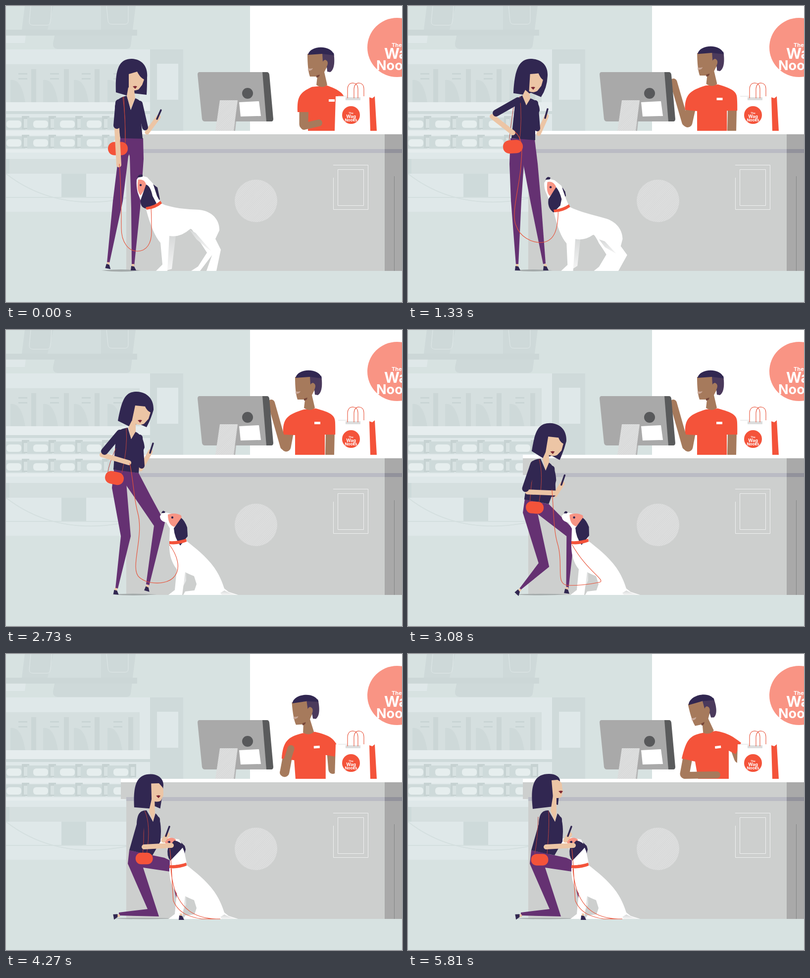
Recreate the animation shown at these times as an HTML page. Size 800x600 px, loop 5.88 s.

```html
<!DOCTYPE html>
<html lang="en">
<head>
<meta charset="utf-8">
<title>Shop counter</title>
<style>
html, body { margin: 0; width: 100%; height: 100%; overflow: hidden; background: #d7e2e1; }
svg { display: block; width: 100%; height: 100%; }
text { font-family: Inter, "Open Sans", sans-serif; font-weight: 700; fill: #fff; }
.line { fill: none; stroke: #e85239; stroke-width: 1.1; }
.limb { fill: none; stroke-linecap: round; stroke-linejoin: round; }
.navy { fill: #312751; }
.red { fill: #f4533a; }
.skin { fill: #ecc5a5; }
.brown { fill: #a67a5c; }
.pants { fill: #653172; }
#strap { stroke: #b8433f; stroke-width: 1; }
</style>
</head>
<body>
<svg viewBox="0 0 800 600" preserveAspectRatio="none">
  <defs>
    <pattern id="hatch" width="3" height="3" patternUnits="userSpaceOnUse" patternTransform="rotate(45)">
      <rect width="3" height="3" fill="#dedfdf"/><rect width="1" height="3" fill="#d5d6d6"/>
    </pattern>
    <linearGradient id="shade" x1="0" y1="0" x2="0" y2="1">
      <stop stop-color="#d6d8d8"/><stop offset="1" stop-color="#f6f6f6"/>
    </linearGradient>
  </defs>
  <rect width="800" height="600" fill="#d7e2e1"/>

  <g id="shelves">
    <path fill="#ced9d9" d="M38 0H112L114 48H32ZM190 0H262L252 80Q251 87 243 87H104Q94 87 95 75L101 48H190Z"/>
    <path fill="#d3dede" d="M96 0H192V48H84Z"/>
    <path fill="none" stroke="#dfe8e8" d="M50 0L47 32Q47 39 55 39H82Q89 39 90 32L92 0M203 0L206 30Q207 37 214 37H240Q247 37 247 30V0"/>
    <path fill="#ccd7d7" d="M0 48H265V60H0Z"/>
    <path fill="#dfe8e9" d="M0 60H40L38 75H0ZM0 88H291V310H0ZM0 340H243V417H0Z"/>
    <path fill="#cfdada" d="M291 88H358V253H291Z"/>
    <path fill="#dfe8e9" d="M305 117H348V190H305Z"/>
    <path fill="#d5dfdf" d="M0 118H270V195H0ZM0 310H243V340H0Z"/>
    <path fill="#e6edee" d="M0 195H291V213H0ZM0 253H240V262H0ZM0 291H240V297H0Z"/>
    <path fill="#cedada" d="M0 213H291V219H0ZM112 340H162V387H112ZM0 310H7V340H0Z"/>
    <path fill="none" stroke="#d4dfdf" stroke-width="2" d="M0 340Q100 418 243 390M0 388H243"/>
  </g>

  <rect x="493" width="307" height="253" fill="#fff"/>
  <circle cx="790" cy="84" r="60" fill="#f99484"/>
  <text x="779" y="83" font-size="11">The</text>
  <text x="764" y="107" font-size="30">Wag</text>
  <text x="748" y="130" font-size="27">Nooks</text>

  <g id="bubble">
    <circle r="33" fill="#ecf3f3"/>
    <path fill="#f4f1f2" d="M-24 -22H-14V29L-24 22ZM-6 -32H6V32H-6ZM14 -29L24 -22V22L14 29Z"/>
    <text y="12" text-anchor="middle" font-size="34" style="font-family:Lato,sans-serif;font-weight:300;fill:#653172">$</text>
  </g>

  <g id="cashier">
    <path id="cArmR" class="limb" stroke="#a67a5c" stroke-width="18"/>
    <path id="cArmL" class="limb" stroke="#a67a5c" stroke-width="19"/>
    <path id="cPants" class="navy"/>
    <path id="cShirt" class="red"/>
    <path id="cFore" class="limb" stroke="#a67a5c" stroke-width="14"/>
    <g id="cTag"><rect width="12" height="5" fill="#fff"/></g>
    <g id="cHead">
      <path class="brown" d="M609 97H646L648 110Q653 112 651 120L647 126L643 134L649 160Q639 168 627 160L629 143H614Q609 130 609 97Z"/>
      <path fill="#4b3a5c" d="M639 96L662 95C664 108 665 128 655 134L649 133L648 123Q653 112 645 109Q641 110 640 113Z"/>
      <path class="navy" d="M610 99C614 79 658 78 663 100L639 97Z"/>
      <path fill="#77473a" d="M627 141L634 139Q633 145 627 145Z"/>
      <path fill="#c9a797" d="M610 126Q614 128 620 126Q618 132 610 131Z"/>
    </g>
  </g>

  <g id="monitor">
    <path fill="#b5b6b6" d="M457 225H466L463 253H455Z"/>
    <path fill="#a9a9a9" d="M391 134H520L528 234H402Q397 234 396 229L387 139Q387 134 391 134Z"/>
    <path fill="#5a5b5c" d="M518 134H527Q531 134 532 139L540 229Q540 234 536 234H526Z"/>
    <path fill="url(#hatch)" d="M432 191H468L460 253H423Z"/>
    <circle cx="488" cy="177" r="11" fill="#58595b"/>
    <path fill="#fff" d="M471 195L511 193L515 223L474 224Z"/>
  </g>

  <g id="bag">
    <path fill="#fff" d="M666 183H736V253H664Z"/>
    <path fill="#dcdddd" d="M686 185H716V191H686Z"/>
    <path stroke="#ddd" d="M671 183H690"/>
    <path class="line" d="M690 187V168Q691 156 701 156Q711 157 711 168V187M703 187V168Q704 156 713 156Q723 157 723 168V183"/>
    <path class="red" d="M734 185L740 187L745 183L749 253H736Z"/>
    <circle cx="697" cy="221" r="18" class="red"/>
    <g text-anchor="middle"><text x="697" y="219" font-size="5">The</text><text x="697" y="227" font-size="9">Wag</text><text x="697" y="234" font-size="8">Nooks</text></g>
  </g>

  <g id="counter">
    <path fill="#cdcfce" d="M232 260H800V294H765V537H243V294H232Z"/>
    <path fill="#a9a9a9" d="M765 260H800V537H765Z"/>
    <path fill="#fff" d="M232 253H800V260H232Z"/>
    <path fill="#babbc4" d="M243 290H765V298H243Z"/>
    <path fill="#92929b" d="M765 290H800V298H765Z"/>
    <path stroke="#858686" d="M784.500 345V537"/>
    <path fill="none" stroke="#f0f1f1" d="M661 322.500H731.500V412.500H661.500V348M670.500 331.500H722.500V404.500H670.500Z"/>
    <circle cx="505" cy="395" r="43" fill="url(#hatch)"/>
  </g>

  <path id="shadow" fill="#a4aaaa"/>
  <path id="legL" class="pants"/>
  <path id="legR" class="pants"/>

  <g id="dog">
    <path id="dFar" fill="url(#shade)"/>
    <path id="dHind" fill="#fff"/>
    <path id="dBody" fill="#fff"/>
    <path id="dThigh" fill="url(#shade)"/>
    <path id="dEar2" class="navy"/>
    <path id="dHead" fill="#fff"/>
    <path id="dPatch" fill="#f79484"/>
    <path id="dEar" class="navy"/>
    <path id="dNose" class="navy"/>
    <g id="dEye"><circle r="2.200" class="navy"/></g>
    <path id="dCollar" class="red"/>
  </g>

  <g id="shoeL"><path class="skin" d="M-2 -9H3V-3H-2Z"/><path class="navy" d="M-3 -5L3 -4L7 4H-4Z"/></g>
  <g id="shoeR"><path class="skin" d="M-2 -9H3V-3H-2Z"/><path class="navy" d="M-3 -5L3 -4L7 4H-4Z"/></g>

  <g id="woman">
    <path id="foreR" class="limb" stroke="#ecc5a5" stroke-width="9"/>
    <path id="phone" class="limb" stroke="#312751" stroke-width="3.500"/>
    <path id="torso" class="navy"/>
    <path id="armR" class="limb" stroke="#312751" stroke-width="12"/>
    <path id="strap" class="line"/>
    <g id="purse"><rect x="-20" y="-13.500" width="40" height="27" rx="13" class="red"/></g>
    <path id="foreL" class="limb" stroke="#ecc5a5" stroke-width="10"/>
    <path id="armL" class="limb" stroke="#312751" stroke-width="14"/>
    <path id="hair" class="navy"/>
    <path id="neck" class="skin"/>
    <path id="face" class="skin"/>
    <g id="lips"><path fill="#7a2632" d="M-5 -1L0 -2L4 -1L0 4Z"/></g>
  </g>
  <path id="leash" class="line"/>
</svg>

<script>
const LOOP = 5880, STEP = 70;
const $ = id => document.getElementById(id);
const NUM = /-?\d+(\.\d+)?/g;
const tracks = [];

// Keys map a time to a path or transform; all strings of one track share a structure.
function track(id, attr, keys) {
  const times = Object.keys(keys).map(Number);
  const shape = keys[times[0]];
  const values = times.map(t => keys[t].match(NUM).map(Number));
  tracks.push({ node: $(id), attr, times, shape, values });
}
const path = (id, keys) => track(id, 'd', keys);
const move = (id, keys) => track(id, 'transform', keys);

// Monotone cubic: smooth through keys without overshoot.
function sample({ times, values }, t) {
  const last = times.length - 1;
  if (t >= times[last]) return values[last];
  const i = times.findIndex(x => x > t) - 1;
  const span = times[i + 1] - times[i], u = (t - times[i]) / span;
  return values[i].map((a, n) => {
    const slope = k => k < 0 || k >= last ? 0 : (values[k + 1][n] - values[k][n]) / (times[k + 1] - times[k]);
    const tangent = k => {
      const p = slope(k - 1), q = slope(k);
      return p * q > 0 ? 2 * p * q / (p + q) : 0;
    };
    const b = values[i + 1][n], v = 1 - u;
    return a * (1 + 2 * u) * v * v + b * u * u * (3 - 2 * u)
      + span * u * v * (v * tangent(i) - u * tangent(i + 1));
  });
}

function draw(now) {
  const t = Math.floor(now % LOOP / STEP) * STEP;
  for (const item of tracks) {
    const v = sample(item, t);
    let n = 0;
    item.node.setAttribute(item.attr, item.shape.replace(NUM, () => +v[n++].toFixed(2)));
  }
}

// Repeated shelf stock
const box = (x, y, w, h, fill, rx = 0) => `<rect x="${x}" y="${y}" width="${w}" height="${h}" rx="${rx}" fill="${fill}"/>`;
let stock = '';
for (const [i, x] of [51, 117, 179, 247].entries()) {
  const dash = 25 + i * 64;
  stock += `<path fill="#ced9d9" d="M${x - 42} 195V150Q${x - 20} 146 ${x - 12} 195Z"/>`
    + box(x, 128, 10, 67, '#cbd6d6') + box(dash, 136, 18, 3, '#c9d5d5') + box(dash, 146, 18, 3, '#c9d5d5');
}
for (const y of [226, 264]) for (let i = 0; i < 5; i++) {
  const x = i * 54;
  stock += box(x - 11, y, 50, 25, '#cedada') + box(x + 32, y - 3, 15, 27, '#c6d2d2')
    + box(x + 36, y + 3, 8, 18, '#d8e2e2') + box(x + 1, y + 6, 30, 15, '#e6eeee', 6);
}
$('shelves').insertAdjacentHTML('beforeend', stock);

const hold = (p, from, to) => ({ [from]: p, [to]: p });

// Payment bubble
move('bubble', { 0: 'translate(440,68) scale(0)', 1330: 'translate(440,68) scale(0)',
  ...hold('translate(440,68) scale(1)', 1750, 2480), 2700: 'translate(440,68) scale(0)' });

// Cashier
path('cShirt', {
  0: 'M589,215 C588,185 592,176 618,164 L648,161 C668,168 684,176 684,190 L684,215 L666,215 L666,253 L610,253 L611,215Z',
  700: 'M558,207 C566,180 572,171 600,162 L628,159 C655,169 664,176 664,186 L666,213 L646,213 L646,253 L585,253 L584,213Z',
  ...hold('M560,212 C558,178 570,171 602,161 L626,159 C655,167 665,172 665,188 L666,212 L644,212 L644,253 L584,253 L584,213Z', 1700, 3850),
  4750: 'M553,212 C562,175 568,165 595,160 L622,156 C645,160 655,166 673,180 L662,203 L648,196 L648,253 L586,253 L580,218Z' });
path('cArmL', {
  0: 'M602,205 L602,240', 700: 'M572,205 L561,235',
  ...hold('M572,205 L566,237', 1600, 3850), 4750: 'M566,205 L559,243' });
path('cFore', {
  0: 'M602,244 L632,237', 500: 'M566,240 L552,215', 700: 'M558,236 L541,194',
  ...hold('M561,236 L536,148', 1600, 3850), 4750: 'M559,246 L624,245' });
path('cArmR', {
  0: 'M674,210 L676,250', 700: 'M656,205 L655,252',
  ...hold('M655,205 L654,252', 1600, 3850), 4750: 'M660,190 L668,212' });
path('cPants', { ...hold('M630,255 L644,255 L644,258 L630,258Z', 0, 3850), 4750: 'M628,250 L648,250 L648,258 L628,258Z' });
move('cTag', { 0: 'translate(652,189) rotate(0)', 700: 'translate(628,186) rotate(0)',
  ...hold('translate(623,186) rotate(0)', 1600, 3850), 4750: 'translate(620,187) rotate(-7)' });
move('cHead', { 0: 'translate(0,0) rotate(0,636,150)', 700: 'translate(-22,-2) rotate(-1,636,150)',
  ...hold('translate(-25,-2) rotate(0,636,150)', 1700, 3850),
  4800: 'translate(-32,0) rotate(-11,636,150)', 5600: 'translate(-33,-2) rotate(-12,636,150)' });

// Woman: standing, arm raised, bending, kneeling
path('torso', {
  0: 'M220,205 C222,190 230,185 244,182 L252,211 L261,187 C272,190 277,200 278,215 L273,235 L276,269 L231,268Z',
  ...hold('M216,200 C219,186 226,184 232,181 L239,201 L246,187 C258,190 266,198 266,212 L257,235 L257,272 L209,268Z', 650, 2300),
  2730: 'M222,215 C226,202 234,200 246,198 L253,221 L261,206 C274,212 279,225 280,238 L270,262 L268,290 L217,283Z',
  3450: 'M264,345 C265,322 272,317 284,317 L297,340 L302,323 C311,330 313,345 313,360 L312,380 L296,408 L249,398Z' });
path('neck', {
  0: 'M247,165 L259,171 L261,187 L252,209 L244,182Z',
  ...hold('M237,170 L246,178 L247,188 L239,201 L231,182Z', 650, 2300),
  2730: 'M254,184 L262,190 L262,206 L253,221 L247,198Z',
  ...hold('M296,304 L301,310 L302,323 L297,340 L290,318Z', 3450, 4000),
  4480: 'M293,287 L300,291 L300,323 L297,340 L288,318Z' });
path('armL', { 0: 'M228,196 L224,242', ...hold('M222,192 L178,217', 650, 2300), 2730: 'M230,209 L199,246', 3450: 'M275,328 L267,384' });
path('armR', { 0: 'M270,198 L281,246', ...hold('M257,197 L261,248', 650, 2300), 2730: 'M270,218 L274,275', 3450: 'M305,335 L306,378' });
path('foreL', { 0: 'M224,248 L228,322', ...hold('M170,224 L212,257', 650, 2300), 2730: 'M194,253 L248,269', 3450: 'M279,391 L334,388' });
path('foreR', { 0: 'M285,256 L308,225', ...hold('M264,259 L280,223', 650, 2300), 2730: 'M272,282 L292,246', 3450: 'M318,378 L327,366' });
path('phone', { 0: 'M305,229 L313,211', ...hold('M277,227 L282,209', 650, 2300), 2730: 'M291,249 L297,230', 3450: 'M323,369 L330,350' });
path('legL', {
  0: 'M231,267 L224,330 L216,395 L204,520 L209,521 L236,395 L247,305 L262,268Z',
  ...hold('M207,268 L205,320 L208,395 L218,524 L223,524 L229,395 L235,305 L240,270Z', 650, 2300),
  2730: 'M218,283 L214,320 L232,418 L221,524 L226,524 L252,418 L243,310 L245,285Z',
  3450: 'M249,398 L246,425 L286,517 L228,524 L228,530 L309,532 L277,433 L285,405Z' });
path('legR', {
  0: 'M240,267 L250,305 L253,410 L254,527 L259,527 L271,410 L278,310 L277,268Z',
  ...hold('M225,268 L231,310 L248,400 L273,523 L278,522 L269,400 L262,320 L256,271Z', 650, 2300),
  2730: 'M235,284 L243,315 L299,397 L283,515 L289,519 L321,390 L293,338 L268,290Z',
  3450: 'M255,400 L277,433 L331,441 L352,528 L355,530 L345,425 L320,413 L296,408Z' });
move('shoeL', { 0: 'translate(205,528) rotate(10)', ...hold('translate(220,532) rotate(0)', 650, 2300),
  2730: 'translate(221,532) rotate(5)', 3450: 'translate(221,531) rotate(80)' });
move('shoeR', { 0: 'translate(256,532) rotate(0)', ...hold('translate(277,532) rotate(0)', 650, 2300),
  2730: 'translate(284,525) rotate(15)', 3450: 'translate(353,535) rotate(0)' });
path('shadow', { 0: 'M193,536 Q233,532 273,536 Q233,541 193,536Z', ...hold('M213,536 Q252,532 292,536 Q252,540 213,536Z', 650, 2300),
  2730: 'M213,536 Q258,533 305,536 Q258,540 213,536Z', 3450: 'M213,536 Q270,534 340,536 Q270,539 213,536Z' });

const headKeys = (up, lookDown, glance, bend, kneel, lookUp) => ({ 0: up, ...hold(lookDown, 750, 1150),
  ...hold(glance, 1650, 2300), 2730: bend, ...hold(kneel, 3450, 4000), 4480: lookUp });
path('hair', headKeys(
  'M222,175 C220,125 230,107 254,107 C277,108 287,125 285,145 Q285,165 284,180 L258,177 L246,182Z',
  'M212,177 C216,130 224,108 250,108 C274,109 285,124 284,142 Q283,167 267,186 L248,176 L235,180Z',
  'M215,176 C214,125 224,105 246,105 C270,106 279,122 277,142 Q276,165 273,181 L250,176 L239,181Z',
  'M226,184 C234,142 240,125 264,125 C288,126 299,143 298,162 Q293,180 284,197 L268,190 L248,195Z',
  'M269,306 C271,264 278,244 303,244 C327,245 336,262 334,281 Q330,305 324,324 L306,315 L294,320Z',
  'M252,314 C247,270 252,243 285,243 C298,243 306,249 307,256 Q306,280 303,306 L297,304 L294,309Z'));
path('face', headKeys(
  'M248,138 L265,133 C270,143 274,146 279,149 L275,160 L268,169 C262,172 254,172 248,170Z',
  'M249,139 L266,138 C269,146 271,150 274,152 L270,164 L262,173 C256,177 250,176 246,174Z',
  'M241,136 L258,133 C262,140 266,142 270,144 L268,156 L260,170 C254,174 246,173 241,170Z',
  'M261,153 L281,155 C284,162 288,165 292,167 L288,180 L279,190 C270,194 262,192 254,186Z',
  'M298,272 L319,272 C321,280 326,283 328,284 L325,298 L317,308 C312,312 304,311 296,306Z',
  'M290,256 L302,255 C308,258 312,262 311,268 L313,279 L310,290 C304,293 298,292 293,291Z'));
move('lips', headKeys('translate(261,164)', 'translate(253,167)', 'translate(253,163)',
  'translate(271,184)', 'translate(307,302)', 'translate(309,279)'));

move('purse', { 0: 'translate(226,289) rotate(0) scale(1)', 700: 'translate(212,287) rotate(4) scale(1)',
  ...hold('translate(212,285) rotate(-5) scale(1)', 1500, 2300), 2730: 'translate(219,300) rotate(12) scale(0.95)',
  ...hold('translate(291,414) rotate(-4) scale(0.87)', 3450, 4000), 4750: 'translate(251,416) rotate(10) scale(0.87)',
  5150: 'translate(254,416) rotate(7) scale(0.87)', 5810: 'translate(266,417) rotate(0) scale(0.87)' });
path('strap', {
  0: 'M236,184 Q242,230 241,278 M238,184 Q241,230 241,278',
  ...hold('M226,183 Q231,230 225,275 M213,205 Q208,240 204,275', 650, 2300),
  2730: 'M243,199 Q246,240 234,290 M222,240 Q208,270 205,292',
  ...hold('M280,318 Q296,345 292,402 M279,318 Q293,345 290,402', 3450, 4000),
  4750: 'M281,318 Q286,345 267,405 M264,335 Q252,380 244,405',
  5810: 'M284,318 Q286,345 281,405 M263,330 Q262,375 256,405' });

// Dog: standing, sitting, then petted
const SIT = 1150, SAT = 1700;
const pose = (id, stand, sit) => path(id, { ...hold(stand, 0, SIT), [SAT]: sit });
const dogHead = (id, first, second, sit, nudged, petted) =>
  path(id, { 0: first, ...hold(second, 700, SIT), ...hold(sit, SAT, 2300), ...hold(nudged, 2730, 3000), 3500: petted });
pose('dBody',
  'M283,412 L313,400 C335,410 365,412 390,413 C418,416 432,435 431,455 L423,472 L434,494 L425,537 L405,537 L418,500 L385,465 Q375,450 372,452 Q352,470 330,466 L326,537 L303,537 L316,524 L312,480 Q296,462 283,412Z',
  'M330,434 L365,428 C380,440 404,458 421,482 C432,498 437,512 441,524 L450,531 L469,537 L425,537 L358,537 L362,530 L387,527 Q388,505 380,499 Q370,495 362,491 L356,537 L328,537 L341,527 L345,485 Q329,465 330,434Z');
pose('dHind', 'M375,452 L400,465 L420,500 L392,537 L374,537 L388,528 L406,500Z', 'M380,499 L400,505 L420,520 L420,537 L380,537 L380,530 L385,515Z');
pose('dFar', 'M327,464 L343,465 L335,533 L320,537Z', 'M345,485 L364,492 L364,508 L350,534Z');
pose('dThigh', 'M370,453 L383,460 L415,497 L405,490 L385,473Z', 'M433,533 L441,528 L452,533 L466,537 L436,537Z');
const headUp = 'M264,352 L270,343 L285,347 L297,360 L305,385 L313,400 L285,412 L274,400 L266,378 Q263,365 264,352Z';
dogHead('dHead', headUp, headUp,
  'M309,377 L316,369 L330,372 L348,377 L362,410 L365,428 L330,432 L329,402 L322,390 Q309,388 309,377Z',
  'M311,377 L318,369 L332,372 L350,377 L363,410 L365,428 L330,432 L331,402 L324,390 Q311,388 311,377Z',
  'M305,377 L312,374 L330,372 L350,376 L360,400 L365,424 L331,430 L331,408 L324,392 Q305,390 305,377Z');
dogHead('dPatch',
  'M267,352 Q280,350 283,362 L284,366 L272,384 Q263,375 267,352Z',
  'M267,351 Q277,349 281,362 L281,366 L270,381 Q263,372 267,351Z',
  'M325,374 Q340,369 352,376 L353,384 L338,399 Q325,395 325,374Z',
  'M327,374 Q342,369 354,376 L355,384 L340,399 Q327,395 327,374Z',
  'M319,378 Q335,368 343,376 L343,380 L335,386 Q322,388 319,378Z');
dogHead('dEar',
  'M283,362 Q292,365 296,385 L304,400 L290,411 Q270,412 272,393Z',
  'M281,362 Q288,370 292,388 L290,400 L278,413 Q265,405 268,388Z',
  'M353,383 Q360,388 365,402 L360,418 L341,435 Q328,420 331,402Z',
  'M354,381 Q361,386 366,400 L367,418 L352,437 Q340,420 339,402Z',
  'M340,378 Q352,380 359,390 L352,398 L332,419 Q324,410 327,392Z');
dogHead('dEar2', 'M294,359 L306,368 L311,392 L304,397Z', 'M299,362 L305,372 L306,378 L302,385Z',
  'M350,385 L355,390 L358,405 L350,410Z', 'M352,385 L357,390 L360,405 L352,410Z', 'M354,382 L361,389 L363,396 L359,412Z');
dogHead('dNose', 'M265,348 Q268,340 276,342 L276,346Z', 'M266,346 Q270,337 277,341 L276,345Z',
  'M312,371 Q315,363 320,369 L318,371Z', 'M314,371 Q317,363 322,369 L320,371Z', 'M326,381 Q329,378 332,381 L330,383Z');
move('dEye', { ...hold('translate(272,363)', 0, SIT), ...hold('translate(336,380)', SAT, 3000), 3500: 'translate(330,381)' });
pose('dCollar', 'M282,408 Q300,405 312,395 L315,400 Q303,411 284,413Z', 'M330,428 Q348,429 364,423 L365,429 Q348,436 330,434Z');

path('leash', {
  0: 'M229,320 C232,360 233,400 233,450 C233,480 248,497 265,497 C285,497 294,480 294,458 C294,440 294,425 293,410',
  ...hold('M216,255 C238,270 230,305 226,335 C218,370 198,430 212,453 C222,475 245,477 260,476 C285,475 296,460 293,410', 720, 1100),
  ...hold('M216,255 C230,275 228,300 230,330 C235,380 234,410 234,425 C236,450 258,486 288,488 C310,488 320,460 329,435', 1750, 2300),
  2730: 'M250,270 C258,310 258,340 266,370 C280,420 248,485 270,502 C290,518 325,515 338,502 C356,484 345,455 330,435',
  3570: 'M331,395 C333,430 331,480 338,510 C345,540 365,537 385,530 C410,518 425,510 433,523 C440,545 375,545 333,435',
  4200: 'M331,395 C335,430 336,480 338,500 C348,525 370,533 395,537 C405,537 420,537 433,537 C395,537 340,530 333,435' });

const start = performance.now();
function tick() {
  draw(performance.now() - start);
  requestAnimationFrame(tick);
}
tick();
</script>
</body>
</html>
```
